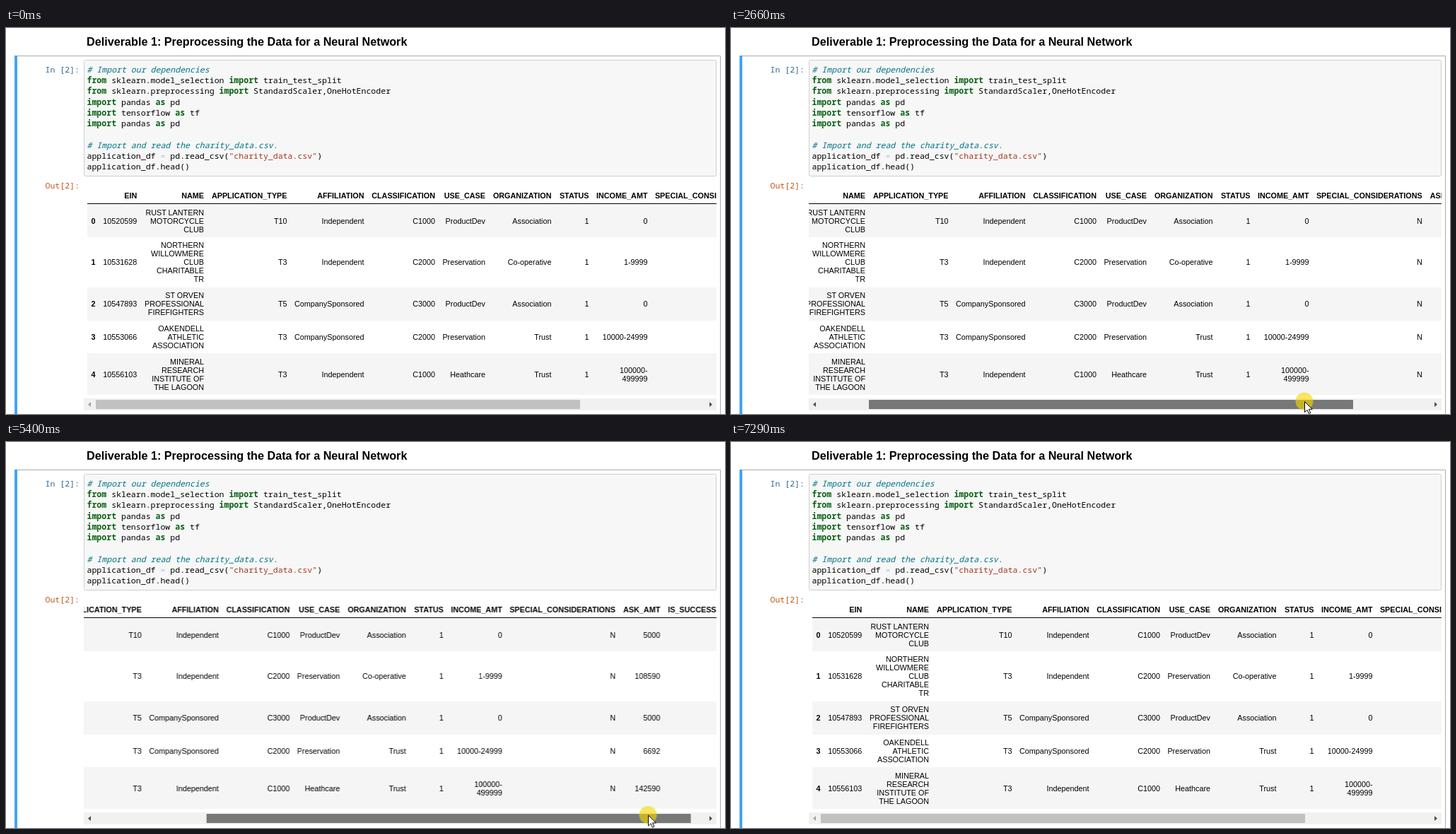
Recreate the animation shown at these times as an HTML page. Size 1017 by 546 pixels, loop 7.82 s.

```html
<!DOCTYPE html>
<html lang="en">
<head>
<meta charset="utf-8">
<title>Notebook table scroll</title>
<style>
html, body { margin: 0; width: 100%; height: 100%; overflow: hidden; background: #fff; }
svg { display: block; width: 1017px; height: 546px; }
text { white-space: pre; }
.title { font: bold 16.2px "Liberation Sans", Arial, sans-serif; }
.code { font: 11.55px "Noto Sans Mono", "DejaVu Sans Mono", monospace; }
.k { font-weight: 600; fill: #0a6414; }
.c { font-style: italic; fill: #007585; }
.s { fill: #a2381f; }
.o { fill: #9cc8e6; }
#table { font: 10.8px "Liberation Sans", Arial, sans-serif; text-anchor: end; }
#table .b { font-weight: bold; }

#table, #thumb, #cursor, #left, #right {
  animation: 7.82s linear infinite;
}
#table { animation-name: scroll; }
#thumb { animation-name: drag, press; animation-timing-function: linear, step-end; }
#cursor { animation-name: point, show; animation-timing-function: linear, step-end; }
#left { animation-name: left; animation-timing-function: step-end; }
#right { animation-name: right; animation-timing-function: step-end; }

@keyframes scroll {
  0%, 23.274% { transform: translateX(0); animation-timing-function: steps(3); }
  25.959% { transform: translateX(-23px); animation-timing-function: steps(9); }
  34.015% { transform: translateX(-90px); animation-timing-function: steps(12); }
  44.757% { transform: translateX(-190px); animation-timing-function: steps(6); }
  50.128%, 67.263% { transform: translateX(-231px); animation-timing-function: steps(8); }
  74.552% { transform: translateX(-28px); animation-timing-function: steps(4); }
  78.133%, 100% { transform: translateX(0); }
}
@keyframes drag {
  0%, 23.274% { transform: translateX(0); animation-timing-function: steps(3); }
  25.959% { transform: translateX(17px); animation-timing-function: steps(9); }
  34.015% { transform: translateX(68px); animation-timing-function: steps(12); }
  44.757% { transform: translateX(145px); animation-timing-function: steps(6); }
  50.128%, 67.263% { transform: translateX(176px); animation-timing-function: steps(8); }
  74.552% { transform: translateX(21px); animation-timing-function: steps(4); }
  78.133%, 100% { transform: translateX(0); }
}
@keyframes press {
  0% { fill: #c1c1c1; }
  15.4% { fill: #a8a8a8; }
  18.798% { fill: #787878; }
  79.028% { fill: #a8a8a8; }
  80.8%, 100% { fill: #c1c1c1; }
}
@keyframes point {
  0%, 8.312% { transform: translate(880px, 478px); animation-timing-function: steps(9); }
  16.24%, 23.274% { transform: translate(741px, 533px); animation-timing-function: steps(3); }
  25.959% { transform: translate(758px, 533px); animation-timing-function: steps(9); }
  34.015% { transform: translate(811px, 528px); animation-timing-function: steps(12); }
  44.757% { transform: translate(886px, 528px); animation-timing-function: steps(6); }
  50.128% { transform: translate(918px, 528px); animation-timing-function: steps(5); }
  54.604%, 67.263% { transform: translate(930px, 528px); animation-timing-function: steps(8); }
  74.552% { transform: translate(755px, 524px); animation-timing-function: steps(4); }
  78.133% { transform: translate(730px, 526px); animation-timing-function: steps(12); }
  88.747% { transform: translate(780px, 225px); animation-timing-function: steps(4); }
  92.327%, 100% { transform: translate(840px, 120px); }
}
@keyframes show {
  0% { opacity: 0; }
  8.312% { opacity: 1; }
  93.223%, 100% { opacity: 0; }
}
@keyframes left {
  0% { fill: #a3a3a3; }
  24.169% { fill: #505050; }
  78.133%, 100% { fill: #a3a3a3; }
}
@keyframes right {
  0% { fill: #505050; }
  50.128% { fill: #a3a3a3; }
  68.159%, 100% { fill: #505050; }
}
</style>
</head>
<body>
<svg viewBox="0 0 1017 546" xmlns="http://www.w3.org/2000/svg">
  <clipPath id="view"><rect x="110" y="212" width="895" height="312"/></clipPath>

  <text class="title" x="114" y="25">Deliverable 1: Preprocessing the Data for a Neural Network</text>

  <path d="M12 39.5H1010.5V546" fill="none" stroke="#ababab"/>
  <rect x="12" y="39" width="4" height="507" fill="#42a5f5"/>
  <rect x="110.5" y="45.5" width="894" height="164" rx="2" fill="#f7f7f7" stroke="#cfcfcf"/>

  <g class="code">
    <text x="55.5" y="63" fill="#2c6a9c">In [2]:</text>
    <text x="55.5" y="227" fill="#c4591d">Out[2]:</text>
    <text x="114.5" y="63" class="c"># Import our dependencies</text>
    <text x="114.5" y="78"><tspan class="k">from</tspan> sklearn.model_selection <tspan class="k">import</tspan> train_test_split</text>
    <text x="114.5" y="93"><tspan class="k">from</tspan> sklearn.preprocessing <tspan class="k">import</tspan> StandardScaler,OneHotEncoder</text>
    <text x="114.5" y="109"><tspan class="k">import</tspan> pandas <tspan class="k">as</tspan> pd</text>
    <text x="114.5" y="124"><tspan class="k">import</tspan> tensorflow <tspan class="k">as</tspan> tf</text>
    <text x="114.5" y="139"><tspan class="k">import</tspan> pandas <tspan class="k">as</tspan> pd</text>
    <text x="114.5" y="170" class="c"># Import and read the charity_data.csv.</text>
    <text x="114.5" y="185">application_df <tspan class="o">=</tspan> pd.read_csv(<tspan class="s">"charity_data.csv"</tspan>)</text>
    <text x="114.5" y="200">application_df.head()</text>
  </g>

  <g clip-path="url(#view)"><g id="table">
    <path d="M115 249H1236V296H115ZM115 367H1236V414H115ZM115 460H1236V519H115Z" fill="#f5f5f5"/>
    <rect x="115" y="248" width="1121" height="1"/>
  </g></g>

  <rect x="110" y="524" width="895" height="17" fill="#f1f1f1"/>
  <rect id="thumb" x="127" y="526" width="685" height="13" fill="#c1c1c1"/>
  <path id="left" d="M116 532.5L120 529V536Z" fill="#a3a3a3"/>
  <path id="right" d="M999 532.5L995 529V536Z" fill="#505050"/>

  <g id="cursor" opacity="0">
    <circle r="12.5" fill="#f5d800" opacity=".62"/>
    <path d="M.5 .5V15.5L4 12.2L6.4 17.5L8.8 16.4L6.4 11.3H11.2Z" fill="#fff" stroke="#000"/>
  </g>
</svg>
<script>
const edges = [126.5, 185.3, 280, 397.5, 506.5, 607, 678, 771.5, 824.5, 907.5, 1067.7, 1131, 1231.3];
const heads = ["", "EIN", "NAME", "APPLICATION_TYPE", "AFFILIATION", "CLASSIFICATION", "USE_CASE",
  "ORGANIZATION", "STATUS", "INCOME_AMT", "SPECIAL_CONSIDERATIONS", "ASK_AMT", "IS_SUCCESSFUL"];
const rows = [
  [273, "0", "10520599", "RUST LANTERN|MOTORCYCLE|CLUB", "T10", "Independent", "C1000",
    "ProductDev", "Association", "1", "0", "N", "5000", "1"],
  [331, "1", "10531628", "NORTHERN|WILLOWMERE|CLUB|CHARITABLE|TR", "T3", "Independent", "C2000",
    "Preservation", "Co-operative", "1", "1-9999", "N", "108590", "1"],
  [390, "2", "10547893", "ST ORVEN|PROFESSIONAL|FIREFIGHTERS", "T5", "CompanySponsored", "C3000",
    "ProductDev", "Association", "1", "0", "N", "5000", "0"],
  [437, "3", "10553066", "OAKENDELL|ATHLETIC|ASSOCIATION", "T3", "CompanySponsored", "C2000",
    "Preservation", "Trust", "1", "10000-24999", "N", "6692", "1"],
  [490, "4", "10556103", "MINERAL|RESEARCH|INSTITUTE OF|THE LAGOON", "T3", "Independent", "C1000",
    "Heathcare", "Trust", "1", "100000-|499999", "N", "142590", "1"]
];
const table = document.getElementById("table");

// Right-aligned cell, its lines centred on y
function cell(x, y, value, bold) {
  const lines = value.split("|");
  lines.forEach((line, i) => {
    const text = document.createElementNS("http://www.w3.org/2000/svg", "text");
    text.setAttribute("x", x);
    text.setAttribute("y", y + 4 + 12 * (i - (lines.length - 1) / 2));
    if (bold) text.setAttribute("class", "b");
    text.textContent = line;
    table.append(text);
  });
}

heads.forEach((head, i) => cell(edges[i], 237, head, true));
for (const [y, ...values] of rows) {
  values.forEach((value, i) => cell(edges[i], y, value, i === 0));
}
</script>
</body>
</html>
```
